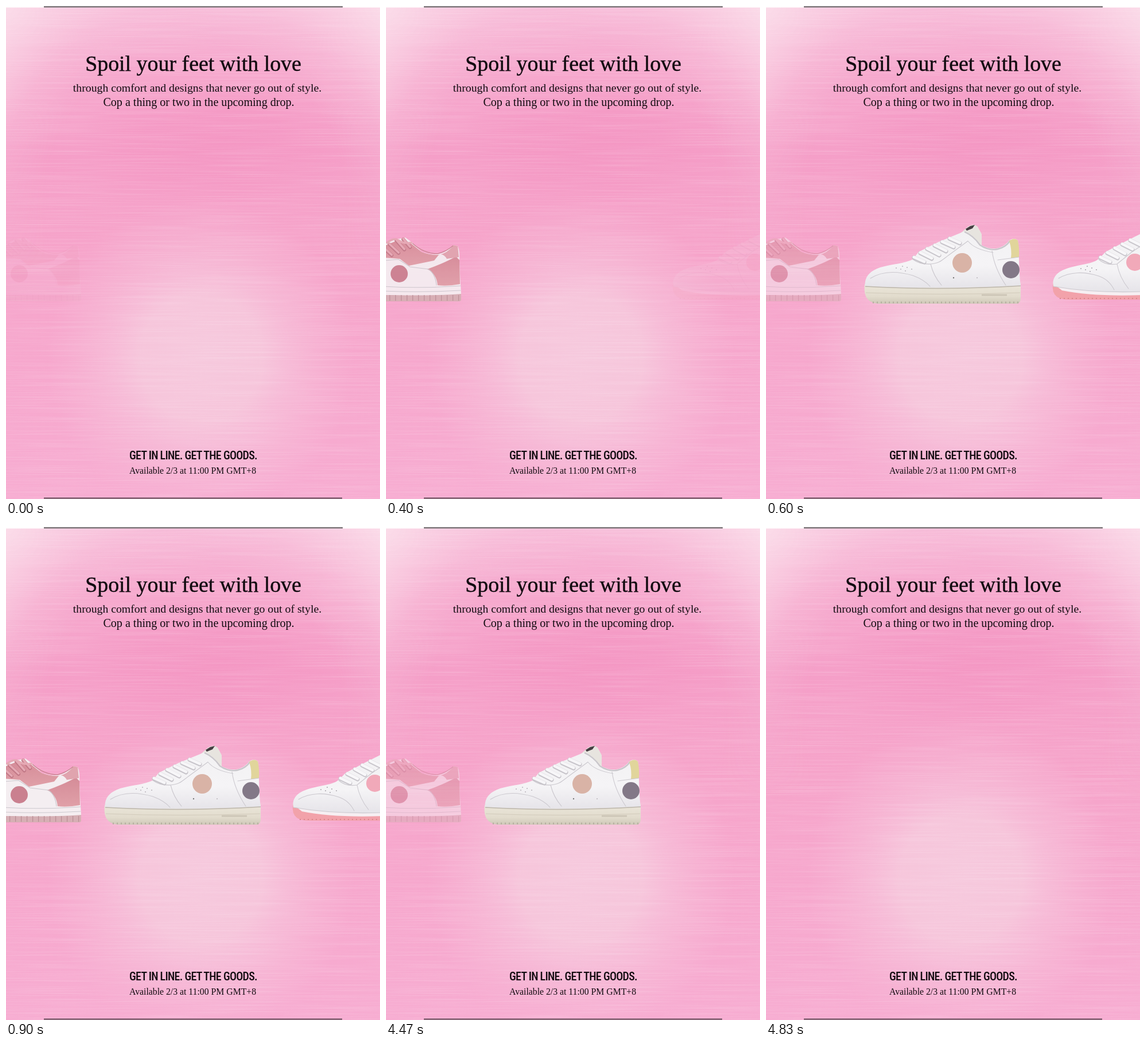
An HTML page that plays this animation: 652 by 858 pixels, repeating every 5.01 s.

```html
<!DOCTYPE html>
<html lang="en">
<head>
<meta charset="utf-8">
<title>Spoil your feet with love</title>
<style>
html, body { margin: 0; width: 100%; height: 100%; overflow: hidden; background: #f6a5cb; }
svg { display: block; width: 100vw; height: 100vh; }
text { text-anchor: middle; fill: #120b10; font-family: "Liberation Serif", serif; }
.head { font-size: 37.9px; stroke: #120b10; stroke-width: .45px; }
.caps {
  font-family: "Roboto Condensed", "Open Sans Condensed", "Liberation Sans Narrow", "Open Sans", sans-serif;
  font-stretch: 62.5%; font-weight: 500; font-size: 24px; letter-spacing: -.035em;
}
.shoe { opacity: 0; }
.seam { fill: none; stroke: #cbc8ce; stroke-width: 1.1; stroke-linecap: round; }
.lace { fill: none; stroke-linecap: round; }
</style>
</head>
<body>
<svg viewBox="0 0 652 858" preserveAspectRatio="none">
  <defs>
    <linearGradient id="base" x2="0" y2="1">
      <stop offset="0" stop-color="#f7b5d5"/>
      <stop offset=".14" stop-color="#f6a8cd"/>
      <stop offset=".3" stop-color="#f59fc8"/>
      <stop offset=".5" stop-color="#f6a4ca"/>
      <stop offset="1" stop-color="#f7acd1"/>
    </linearGradient>
    <radialGradient id="rim" gradientUnits="userSpaceOnUse" cx="330" cy="330" r="470">
      <stop offset=".55" stop-color="#fbe2ec" stop-opacity="0"/>
      <stop offset=".72" stop-color="#fbe2ec" stop-opacity=".22"/>
      <stop offset="1" stop-color="#fbe2ec" stop-opacity=".9"/>
    </radialGradient>
    <linearGradient id="fade" x2="0" y2="1">
      <stop offset=".3" stop-color="#fff"/>
      <stop offset="1" stop-color="#000"/>
    </linearGradient>
    <mask id="upper"><rect width="652" height="480" fill="url(#fade)"/></mask>
    <radialGradient id="deep">
      <stop offset="0" stop-color="#f495c2" stop-opacity=".8"/>
      <stop offset=".5" stop-color="#f495c2" stop-opacity=".55"/>
      <stop offset="1" stop-color="#f495c2" stop-opacity="0"/>
    </radialGradient>
    <radialGradient id="glow">
      <stop offset="0" stop-color="#f6c9dd"/>
      <stop offset=".4" stop-color="#f6c8dc" stop-opacity=".92"/>
      <stop offset=".55" stop-color="#f6c6dc" stop-opacity=".65"/>
      <stop offset=".8" stop-color="#f6c2da" stop-opacity=".3"/>
      <stop offset="1" stop-color="#f6c0da" stop-opacity="0"/>
    </radialGradient>
    <linearGradient id="leather" x2="0" y2="1">
      <stop offset="0" stop-color="#f2f1f3"/>
      <stop offset=".6" stop-color="#f5f4f6"/>
      <stop offset="1" stop-color="#e6e4e9"/>
    </linearGradient>
    <linearGradient id="cream" x2="0" y2="1">
      <stop offset="0" stop-color="#ebe6da"/>
      <stop offset=".65" stop-color="#e2dccd"/>
      <stop offset="1" stop-color="#cfc8b8"/>
    </linearGradient>
    <linearGradient id="rose" x2="0" y2="1">
      <stop offset="0" stop-color="#d58c98"/>
      <stop offset="1" stop-color="#e0a0a8"/>
    </linearGradient>
    <filter id="brush" x="0" y="0" width="100%" height="100%">
      <feTurbulence type="fractalNoise" baseFrequency=".006 .55" numOctaves="2" seed="4"/>
      <feColorMatrix values="0 0 0 0 1  0 0 0 0 .92  0 0 0 0 .96  .7 0 0 0 -.29"/>
    </filter>
  </defs>

  <rect width="652" height="858" fill="url(#base)"/>
  <ellipse cx="365" cy="236" rx="250" ry="120" fill="url(#deep)"/>
  <rect width="652" height="480" fill="url(#rim)" mask="url(#upper)"/>
  <ellipse cx="340" cy="612" rx="268" ry="275" fill="url(#glow)"/>
  <rect width="652" height="858" filter="url(#brush)" opacity=".55"/>
  <rect width="652" height="2.6" fill="#fff"/>
  <path d="M66 1.5H587M66 856.5H586" stroke="#3a3036" stroke-width="1.5"/>

  <text class="head" x="326.5" y="113">Spoil your feet with love</text>
  <text x="333.5" y="149" font-size="19.75">through comfort and designs that never go out of style.</text>
  <text x="336" y="174" font-size="20.1">Cop a thing or two in the upcoming drop.</text>
  <text class="caps" id="caps" x="326.5" y="791">GET IN LINE. GET THE GOODS.</text>
  <text x="325.5" y="814" font-size="15.76">Available 2/3 at 11:00 PM GMT+8</text>

  <g class="shoe" id="left">
    <path d="M-4 498H131V511Q131 514 127 514H-4Z" fill="#d6afb4"/>
    <path d="M-4 484C40 489 90 487 130 484L131 501C90 504 40 504-4 503Z" fill="#f5eef1"/>
    <path d="M-4 414L18 406L34 403L46 412L62 428Q92 438 108 424L118 416L125 418Q129 426 128 444L130 487Q60 492-4 488Z" fill="#f4eef1"/>
    <path d="M-4 418L20 408L42 412L62 428Q78 434 92 433L84 443L40 452L24 440L-4 438Z" fill="url(#rose)"/>
    <path d="M72 458C88 452 104 446 122 436L128 442L129 484Q108 488 90 486Q88 466 72 458Z" fill="url(#rose)"/>
    <path d="M40 413Q64 436 90 434Q108 430 118 416L125 418L127 437L106 440Q100 430 92 433Q62 436 40 413Z" fill="#e0a4ae"/>
    <path d="M46 413Q66 431 90 431Q106 427 117 417" fill="none" stroke="#c98491" stroke-width="1.5"/>
    <path d="M-4 443L22 441L42 454L74 458Q86 466 88 486M-4 488Q60 492 130 487" class="seam" stroke="#d7bfc7"/>
    <path class="lace" stroke="#c17886" stroke-width="6" d="M-3 422L10 434M6 415L22 430M18 408L32 424M30 406L42 420"/>
    <path class="lace" stroke="#e5a9b4" stroke-width="3.6" d="M-3 421L10 433M6 414L22 429M18 407L32 423M30 405L42 419M2 412Q14 402 22 408T44 412"/>
    <path d="M-4 508H130" stroke="#b98d94" stroke-width="10" stroke-dasharray="1.2 8.8"/>
    <path d="M-4 496Q60 499 130 495" class="seam" stroke="#dfd0d6"/>
    <circle cx="23" cy="466" r="15" fill="#ca808f"/>
  </g>

  <g class="shoe" id="mid">
    <path d="M334 400L352 384Q362 378 369 384L376 397V418L330 424Z" fill="#e7e4df"/>
    <path d="M348 388L356 383L364 381L360 387L350 391Z" fill="#453d42"/>
    <path d="M172 484Q170 503 178 511Q184 517 196 518H438Q444 517 444 508V482Z" fill="url(#cream)"/>
    <path d="M173 488C171 472 181 461 199 455C220 449 242 448 256 441L266 428L300 411L334 397L346 392Q362 399 374 415C394 428 414 422 424 408Q433 402 439 408C442 430 440 452 444 487C360 491 260 492 173 488Z" fill="url(#leather)"/>
    <path d="M346 393Q362 400 373 416C394 430 415 424 426 408" fill="none" stroke="#c9c6cb" stroke-width="2.4"/>
    <path d="M424 409Q433 402 439 408Q442 420 441 437L427 439Q429 424 424 409Z" fill="#e1d59b"/>
    <path class="seam" d="M182 474C204 460 232 462 256 469C272 475 280 481 286 488M256 441Q268 450 287 449C302 448 306 443 318 434L352 409M287 449Q292 470 306 486M394 426Q398 456 418 486M404 442L441 437M352 409Q364 424 396 429"/>
    <g fill="#b9b5bb">
      <circle cx="227" cy="456" r="1"/><circle cx="235" cy="458" r="1"/><circle cx="243" cy="461" r="1"/>
      <circle cx="238" cy="453" r="1"/><circle cx="246" cy="455" r="1"/><circle cx="254" cy="458" r="1"/>
      <circle cx="327" cy="473" r="1.2" fill="#777"/><circle cx="368" cy="473" r="1"/>
    </g>
    <path class="lace" stroke="#c6c3c9" stroke-width="7" d="M258 438L276 446M269 430L289 440M281 423L302 434M294 417L314 427M307 411L327 420M320 405L338 413"/>
    <path class="lace" stroke="#f7f6f8" stroke-width="5" d="M258 437L276 445M269 429L289 439M281 422L302 433M294 416L314 426M307 410L327 419M320 404L338 412"/>
    <path d="M173 488C260 493 360 492 444 487" fill="none" stroke="#bcb6ab" stroke-width="1.4"/>
    <path d="M174 499Q300 504 443 499" fill="none" stroke="#d2cbbb"/>
    <path d="M186 516H440" stroke="#b5ae9f" stroke-width="3" stroke-dasharray="2 5"/>
    <path d="M376 503H420" stroke="#cdc6b7" stroke-width="3"/>
    <circle cx="342" cy="447" r="17" fill="#d9b3a6"/>
    <circle cx="427" cy="459" r="15" fill="#837887"/>
  </g>

  <g class="shoe" id="right">
    <path d="M500 483Q498 499 507 506Q514 511 530 511H656V498Z" fill="#f2a2aa"/>
    <path d="M502 484Q580 493 656 490V503Q570 506 516 495Z" fill="#f6eff2"/>
    <path d="M501 488C498 472 508 462 527 456C550 449 570 449 580 440L592 428L622 412L656 395V497Q570 500 501 488Z" fill="url(#leather)"/>
    <path class="seam" d="M510 474C530 462 556 462 580 470Q598 476 607 494M580 441Q592 452 612 449L638 428L656 416M612 449Q616 472 632 492M501 488Q570 500 656 497"/>
    <g fill="#aaa6ad">
      <circle cx="549" cy="457" r="1"/><circle cx="557" cy="459" r="1"/><circle cx="565" cy="462" r="1"/>
      <circle cx="560" cy="453" r="1"/><circle cx="568" cy="456" r="1"/><circle cx="576" cy="459" r="1"/>
    </g>
    <path class="lace" stroke="#c9c6cc" stroke-width="7" d="M583 438L600 446M595 430L613 439M608 422L626 432M621 415L639 424M635 408L653 417"/>
    <path class="lace" stroke="#f8f7f9" stroke-width="5" d="M583 437L600 445M595 429L613 438M608 421L626 431M621 414L639 423M635 407L653 416"/>
    <path d="M512 509H652" stroke="#d9868f" stroke-width="2" stroke-dasharray="2 5"/>
    <circle cx="643" cy="446" r="15" fill="#f1a9b9"/>
  </g>
</svg>
<script>
const LOOP = 5010;

// [ms, opacity]; a repeated time is a hard switch
const tracks = {
  left: [[0, 0], [30, 0], [360, 1], [400, .93], [600, .5], [800, 1],
         [4270, 1], [4470, .5], [4670, 0], [LOOP, 0]],
  mid: [[0, 0], [170, 0], [170, 1], [300, 1], [300, 0], [570, 0], [570, 1],
        [4530, 1], [4530, 0], [4630, 0], [4630, 1], [4830, 1], [4830, 0], [LOOP, 0]],
  right: [[0, 0], [385, 0], [400, .1], [530, 1],
          [4100, 1], [4100, 0], [4270, 0], [4270, .7], [4440, 0], [LOOP, 0]]
};

for (const [id, steps] of Object.entries(tracks)) {
  const frames = steps.map(([t, opacity]) => ({ offset: t / LOOP, opacity }));
  const anim = document.getElementById(id).animate(frames, { duration: LOOP, iterations: Infinity });
  anim.startTime = 0;
  anim.currentTime = 0;
}

// Pick a type size that suits whichever condensed face is available
const caps = document.getElementById("caps");
const size = Math.min(28, 24 * 223 / caps.getComputedTextLength());
caps.style.fontSize = size + "px";
caps.setAttribute("y", 781.5 + size * .356);
</script>
</body>
</html>
```
